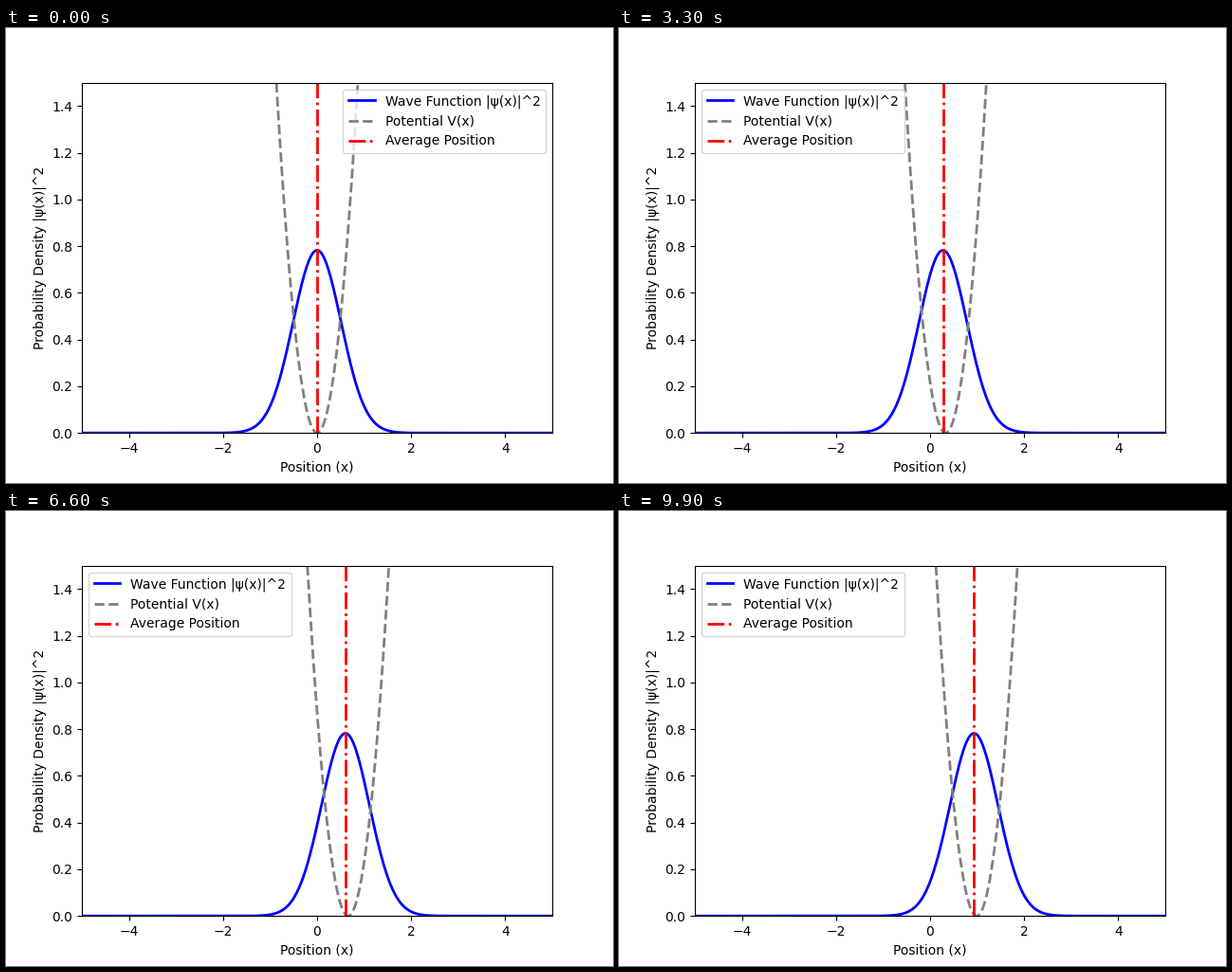
A matplotlib script for the animation above (10000 ms loop, 640 by 480 pixels).

```python
import numpy as np
import matplotlib.pyplot as plt
from matplotlib.animation import FuncAnimation

FRAMES = 100
STIFFNESS = 4.0
DRIFT = 0.01    # trap shift per frame
LAG = 0.057     # steady distance of the packet behind the trap
DECAY = 0.852   # relaxation factor per frame
WIDTH = 1.921   # exponent of the Gaussian density

x = np.linspace(-5, 5, 1000)


def trap_center(i):
    return DRIFT * i


def mean_position(i):
    return trap_center(i) - LAG * (1 - DECAY**i)


def density(i):
    return np.sqrt(WIDTH / np.pi) * np.exp(-WIDTH * (x - mean_position(i))**2)


def potential(i):
    return 0.5 * STIFFNESS * (x - trap_center(i))**2


fig, ax = plt.subplots(figsize=(6.4, 4.8), dpi=100)
ax.set_xlim(-5, 5)
ax.set_ylim(0, 1.5)
ax.set_xlabel("Position (x)")
ax.set_ylabel("Probability Density |ψ(x)|^2")

wave, = ax.plot(x, density(0), "b-", lw=2, label="Wave Function |ψ(x)|^2")
trap, = ax.plot(x, potential(0), "--", color="gray", lw=2,
                label="Potential V(x)")
mean = ax.axvline(0, color="red", ls="-.", lw=2, label="Average Position")
ax.legend(loc="best")


def update(i):
    wave.set_ydata(density(i))
    trap.set_ydata(potential(i))
    mean.set_xdata([mean_position(i)] * 2)
    return wave, trap, mean


anim = FuncAnimation(fig, update, frames=FRAMES, interval=100,
                     repeat=True, repeat_delay=0, blit=False)
plt.show()
```
